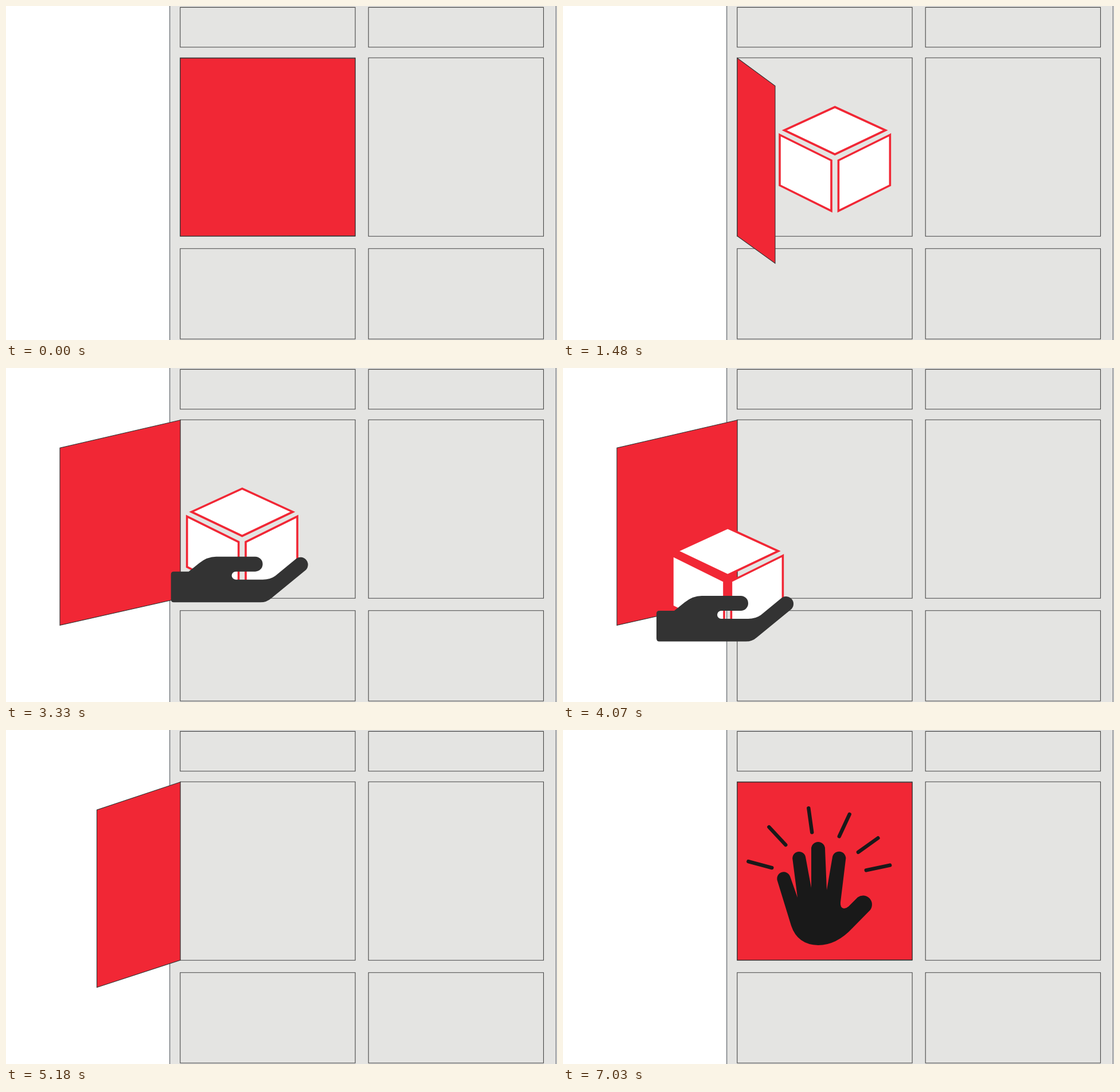
An HTML page with a canvas that plays this animation: 961 by 582 pixels, repeating every 7400 ms.

```html
<!DOCTYPE html>
<html lang="en">
<head>
<meta charset="utf-8">
<title>Locker</title>
<style>
  html, body { margin: 0; width: 100%; height: 100%; overflow: hidden; background: #fff; }
  canvas { display: block; }
</style>
</head>
<body>
<canvas id="stage" width="961" height="582"></canvas>
<script>
const ctx = document.getElementById('stage').getContext('2d');
const STEP = 370, COUNT = 20;
const RED = '#f12735', GREY = '#e4e4e2', LINE = '#444';
const HINGE = 304, CLOSED = 609, OPEN = 94, CUBE_X = 474.2;
const PICK = 8, HOLD = 11, GONE = 14;

// Key points of the free door edge: step, x.
const doorKeys = [[2, CLOSED], [4, 370], [5, 259], [7, 156.5], [PICK, OPEN], [13, OPEN],
                  [14, 158.5], [15, 251], [16, 405], [17, 490], [18, CLOSED]];
// Key points of the carried cube: step, offset.
const carryX = [[PICK, 0], [HOLD, -187], [13, -329]];
const carryY = [[PICK, 0], [HOLD, 102.5], [13, 181]];

const topFace = new Path2D('M0 176 L88.300 216.500 L0 258.500 L-88.300 216.500 Z');
const sideFace = new Path2D('M-96.200 224.500 L-6.200 269 V357 L-96.200 312.500 Z');

// Placed where it supports the cube at the HOLD step.
const palm = new Path2D(`M168 423 H194 L212 408.500 Q226 397 242 397 H310
  A13 13 0 0 1 310 423 H276 A7 7 0 0 0 276 437 H323 Q336 437 345 430.500
  L381.500 400.500 A13 13 0 0 1 398.500 420 L338 469.500 Q330 476.600 319 476.600
  H168 Q163 476.600 163 471 V428 Q163 423 168 423 Z`);

const wave = new Path2D(`M374 263 A11.700 11.700 0 0 1 396 255 L409 292 L400.500 226
  A11.500 11.500 0 0 1 423 221 L433 275 V207 A12 12 0 0 1 457 207 L460 279
  L470 221 A11.700 11.700 0 0 1 493 226 L484 300 Q483 310 490 311
  Q494 311 498 307.500 L514 291.500 A15.700 15.700 0 0 1 535.500 314
  L505 345 Q477 375 445 375 Q409 374 398 341 Z`);

function sample(keys, n) {
  const i = keys.findIndex(k => k[0] >= n);
  if (i < 0) return keys[keys.length - 1][1];
  if (i === 0) return keys[0][1];
  const [n0, a] = keys[i - 1], [n1, b] = keys[i];
  return a + (b - a) * (n - n0) / (n1 - n0);
}

function shape(path, fill) {
  ctx.fillStyle = fill;
  ctx.fill(path);
  ctx.stroke(path);
}

function box(x, y, w, h) {
  const path = new Path2D();
  path.rect(x, y, w, h);
  shape(path, GREY);
}

function drawLockers() {
  ctx.clearRect(0, 0, 961, 582);
  ctx.strokeStyle = '#777b80';
  ctx.lineWidth = 1.5;
  box(285.6, -5, 673.8, 600);
  ctx.strokeStyle = LINE;
  ctx.lineWidth = 1.1;
  for (const x of [303.8, 632.2])
    for (const [top, bottom] of [[2.4, 71.8], [90.3, 401.2], [422.8, 580.2]])
      box(x, top, 305.3, bottom - top);
}

function drawDoor(edge) {
  const skew = edge === CLOSED ? 0 : 48;
  const door = new Path2D();
  door.moveTo(HINGE, 90.8);
  door.lineTo(edge, 91.2 + skew);
  door.lineTo(edge, 400.4 + skew);
  door.lineTo(HINGE, 401);
  door.closePath();
  ctx.strokeStyle = '#333';
  ctx.lineWidth = 1.1;
  shape(door, RED);
}

function drawCube(dx, dy) {
  ctx.save();
  ctx.translate(CUBE_X + dx, dy);
  ctx.strokeStyle = RED;
  ctx.lineWidth = 3.6;
  shape(topFace, '#fff');
  shape(sideFace, '#fff');
  ctx.scale(-1, 1);
  shape(sideFace, '#fff');
  ctx.restore();
}

function drawPalm(dx, dy) {
  ctx.save();
  ctx.translate(dx - sample(carryX, HOLD), dy - sample(carryY, HOLD));
  ctx.fillStyle = '#333';
  ctx.fill(palm);
  ctx.restore();
}

function drawKnock() {
  ctx.save();
  ctx.fillStyle = ctx.strokeStyle = '#191919';
  ctx.lineWidth = 6.4;
  ctx.lineCap = 'round';
  ctx.fill(wave);
  ctx.translate(446, 262);
  for (const angle of [195, 227, 262, 295, 324.5, 348]) {
    ctx.save();
    ctx.rotate(angle * Math.PI / 180);
    ctx.beginPath();
    ctx.moveTo(84.6, 0);
    ctx.lineTo(127, 0);
    ctx.stroke();
    ctx.restore();
  }
  ctx.restore();
}

function render(n) {
  const dx = sample(carryX, n), dy = sample(carryY, n);
  drawLockers();
  if (n <= PICK) drawCube(0, 0);
  drawDoor(sample(doorKeys, n));
  if (n > PICK && n < GONE) {
    drawCube(dx, dy);
    drawPalm(dx, dy);
  }
  if (n === 1 || n === COUNT - 1) drawKnock();
}

const start = performance.now();
let shown = 0;
function tick() {
  const n = Math.floor((performance.now() - start) / STEP) % COUNT;
  if (n !== shown) render(shown = n);
  requestAnimationFrame(tick);
}
render(0);
requestAnimationFrame(tick);
</script>
</body>
</html>
```
